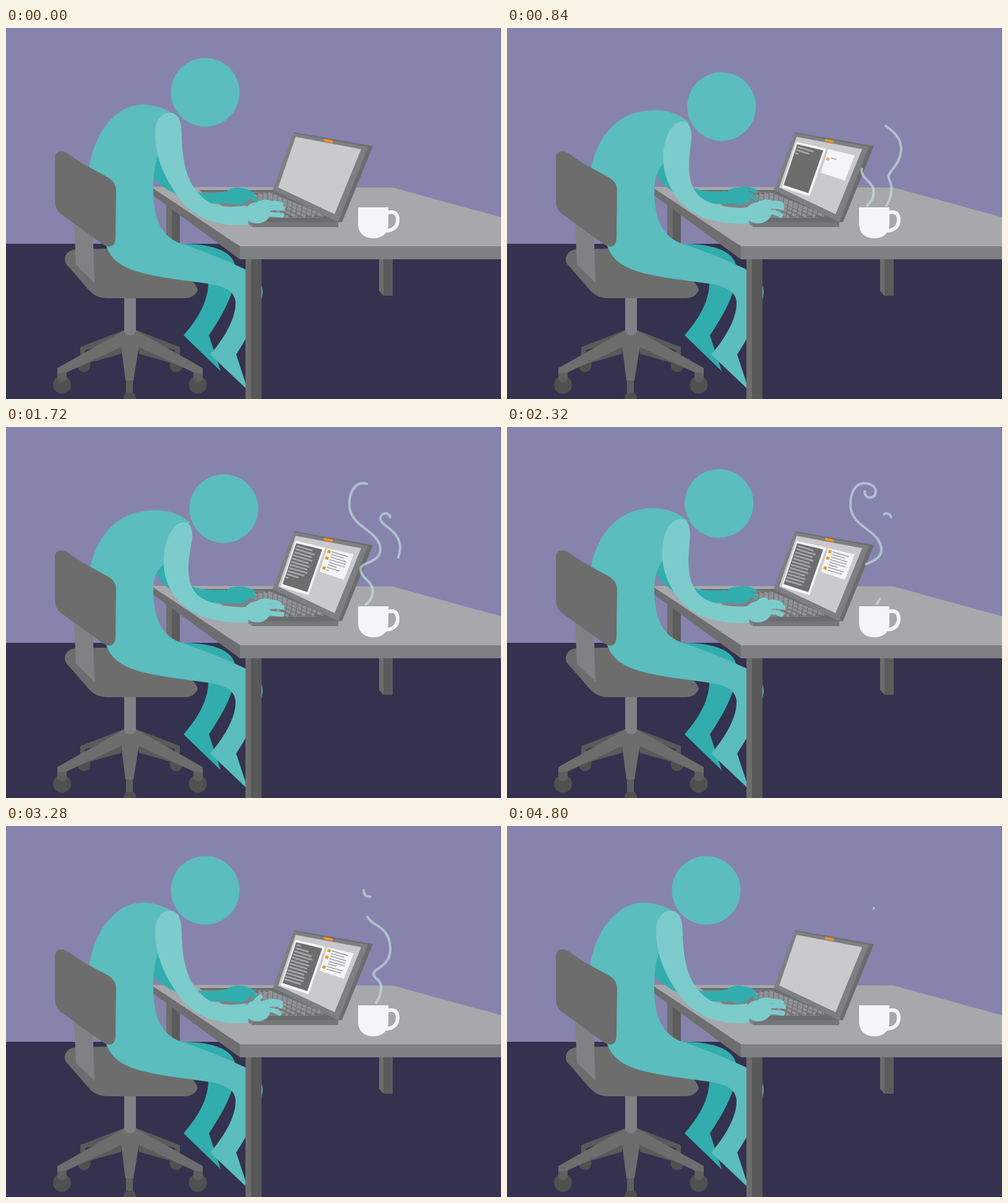
Recreate the animation shown at these times as an HTML page. Size 800 by 600 pixels, loop 4.84 s.

```html
<!DOCTYPE html>
<html lang="en">
<head>
<meta charset="utf-8">
<title>Working late</title>
<style>
  html, body { margin: 0; width: 100%; height: 100%; overflow: hidden; background: #8684ad; }
  svg { display: block; width: 100%; height: 100%; }
  .round { fill: none; stroke-linecap: round; stroke-linejoin: round; }
</style>
</head>
<body>
<svg viewBox="0 0 800 600">
  <path fill="#8684ad" d="M0 0H800V349H0Z"/>
  <path fill="#74729c" d="M799 0H800V349H799Z"/>
  <path fill="#34324e" d="M0 349H800V600H0Z"/>

  <!-- rear table legs -->
  <path fill="#6d6d6e" d="M259 280H268V349H259ZM603 370H610V433L603 425Z"/>
  <path fill="#5b5b5c" d="M268 280H281V349H268ZM610 370H625V433H610Z"/>

  <!-- chair base and seat -->
  <g fill="#505050">
    <circle cx="126" cy="546" r="10.5"/><circle cx="275" cy="546" r="10.5"/>
  </g>
  <path fill="#5a5a5a" d="M190 489L120 516V545H128V521L190 502ZM211 489L281 516V545H273V521L211 502ZM188 508L186 527L122 545L110 540ZM213 508L215 527L279 545L291 540Z"/>
  <g fill="#505050">
    <circle cx="90.5" cy="577" r="14.5"/><circle cx="310" cy="577" r="14.5"/><circle cx="200" cy="598" r="10"/>
  </g>
  <path fill="#5f5f5f" d="M83 551H98V569Q90 577 83 569ZM303 551H318V569Q310 577 303 569ZM194 568H205V590H194Z"/>
  <g fill="#6d6d6d">
    <path d="M191 489L83 550V559L98 557L190 514H211L303 557L318 559V550L210 489Z"/>
    <path d="M190 489H211L215 514L206 570H193L186 514Z"/>
  </g>
  <path fill="#808184" d="M191 430H210V490Q208 497 200.500 497Q193 497 191 490Z"/>
  <path fill="#6d6d6d" d="M95 375C95 365 102 358 115 358L190 356L290 402C302 408 308 416 310 424C306 433 298 437 288 437H165C150 437 142 432 134 424L102 387Q95 381 95 375Z"/>
  <path fill="#808184" d="M110 312L141 330V350L143 412L113 383Z"/>

  <!-- far leg and table -->
  <path fill="#31adae" d="M275 349C322 348 368 356 371 388V403C367 434 347 469 328 497L347 555L287 497C312 468 328 440 327 408Z"/>
  <path fill="#a7a8ab" d="M234 257L625 258L800 306V353H378Z"/>
  <path fill="#6e6e70" d="M234 257L378 353V374L234 268Z"/>
  <path fill="#7f8083" d="M378 353H800V374H378Z"/>

  <!-- laptop -->
  <path fill="#808184" d="M312 263H432L537 308V322H398L340 281Z"/>
  <path fill="#6b6c6e" d="M312 262H432V265H318ZM386 307H537V315H398ZM432 262L537 308V314H520L425 265Z"/>
  <path fill="#6f7072" d="M386 268L430 265L518 306H448Z"/>
  <path fill="#757678" d="M398 314H537V322H398Z"/>
  <g id="keys" stroke="#929396" stroke-width="4.500" stroke-dasharray="7 1.500"/>
  <path fill="#6b6c6e" d="M465 168.500L593 191L543 314H537Z"/>
  <path fill="#7e7f82" d="M465 170L585 192L537 314L431 262Z"/>
  <path fill="#cacacd" d="M468 176L574 196L531 301L440 258Z"/>
  <path stroke="#f7931e" stroke-width="4" d="M514 181L528 184"/>

  <g id="editor">
    <path fill="#f4f5f9" d="M468 184L516 195L489 272L444 258Z"/>
    <path fill="#6d6d6d" d="M469 188L511 198L487 267L447 254Z"/>
    <g id="code" class="round" stroke="#a7a8ab" stroke-width="2.600"/>
  </g>
  <g id="notes">
    <path fill="#f4f5f9" d="M519 196L562 206L546 247L507 234Z"/>
    <g id="list" class="round" stroke="#939598" stroke-width="1.400"/>
    <g id="bullets" fill="#f7931e"/>
  </g>

  <!-- person -->
  <g fill="#31adae" stroke="#31adae">
    <path id="farArm" stroke="none"/>
    <ellipse cx="374" cy="272" rx="21" ry="14" stroke="none"/>
    <g id="farFingers" class="round" stroke-width="6"/>
  </g>
  <path id="torso" fill="#5bbdbd"/>
  <path fill="#6d6d6e" d="M387 374H396V600H387Z"/>
  <path fill="#585858" d="M396 374H413V600H396Z"/>
  <path fill="#6d6d6d" d="M79 210C79 198 92 196 103 205C118 217 140 228 160 239C172 245 178 252 178 264L177 338C177 354 168 357 157 350L92 303C83 297 79 290 79 279Z"/>
  <circle id="head" r="55.500" fill="#5bbdbd"/>
  <g fill="#7ccccc" stroke="#7ccccc">
    <path id="nearArm" stroke="none"/>
    <ellipse cx="406" cy="299" rx="21" ry="17" stroke="none"/>
    <g id="nearFingers" class="round" stroke-width="7.500"/>
  </g>

  <!-- mug and steam -->
  <g id="steam" class="round" stroke="#cde8e6" stroke-width="4" opacity=".6"/>
  <path fill="#f4f5f9" d="M569 290H618V316C618 332 608 340 594 340C579 340 569 332 569 316Z"/>
  <path fill="none" stroke="#f4f5f9" stroke-width="6" d="M617 298.500C628 296 633 300 633 310C633 322 625 328 612 328"/>
</svg>

<script>
const LOOP = 4840, STEP = 40;
const $ = id => document.getElementById(id);

function add(parent, tag, attrs) {
  const el = document.createElementNS('http://www.w3.org/2000/svg', tag);
  for (const name in attrs) el.setAttribute(name, attrs[name]);
  return $(parent).appendChild(el);
}

const ramp = (t, from, to) => Math.min(1, Math.max(0, (t - from) / (to - from)));
const ease = (t, from, to) => { const u = ramp(t, from, to); return u * u * (3 - 2 * u); };

// Blend two paths that share the same commands.
function mix(a, b, p) {
  const target = b.match(/[\d.]+/g);
  let i = 0;
  return a.replace(/[\d.]+/g, n => (+n + (target[i++] - n) * p).toFixed(2));
}

// Show only the part of a path between two fractions.
function trim(el, tail, head, visible) {
  el.style.display = visible ? '' : 'none';
  el.setAttribute('stroke-dasharray', `${Math.max(.001, head - tail)} 2`);
  el.setAttribute('stroke-dashoffset', -tail);
}

const thigh = 'C238 315 255 342 290 351C330 365 360 378 386 390C411 400 417 418 414 434C410 465 390 500 372 528L391 586L330 528C355 499 372 468 371 443C369 424 352 418 330 414C285 407 220 402 190 385C172 375 163 360 160 345Z';
const poses = {
  torso: [
    'M134 228C143 168 178 124 221 124C243 124 262 132 280 145L250 195C240 215 238 238 238 262' + thigh,
    'M135 230C150 166 186 134 245 134.5C266 135 283 142 297 154L258 220C246 228 238 240 238 262' + thigh],
  nearArm: [
    'M241 174C240 150 251 137 265 137C278 137 284 150 284 174C285 225 295 262 330 283C345 290 368 290 388 287L392 318C345 322 308 310 282 278C258 246 242 212 241 174Z',
    'M255 214C256 180 271 154 288 154C298 154 302 165 301 180C296 212 282 264 325 281C345 289 368 292 388 291L392 316C345 318 305 308 280 283C262 262 254 240 255 214Z'],
  farArm: [
    'M246 195C255 235 285 280 355 264L362 283C320 288 270 275 238 243L238 215Z',
    'M258 215C265 245 295 268 355 263L362 284C310 288 265 275 242 237L252 222Z']
};

// Each finger blends from resting to lifted, `rate` times per loop.
const fingers = [
  ['farFingers', 9, 'M372 262Q388 260 399 269', 'M372 262Q386 256 402 264'],
  ['farFingers', 13, 'M380 267Q396 268 405 279', 'M380 267Q393 265 400 274'],
  ['nearFingers', 11, 'M404 287Q416 278 427 283', 'M400 290Q404 280 411 276'],
  ['nearFingers', 12, 'M414 288Q430 280 444 285', 'M414 288Q426 277 441 288'],
  ['nearFingers', 8, 'M414 294Q430 289 447 292', 'M414 294Q430 284 444 291'],
  ['nearFingers', 14, 'M414 301Q430 301 446 303', 'M414 301Q428 293 442 303']
].map(([hand, rate, rest, lifted]) => ({ el: add(hand, 'path', {}), rate, rest, lifted }));

const steam = [
  { d: 'M582 287C591 279 594 270 592 260C590 249 573 243 573 230C573 218 605 220 605 198C605 178 582 167 570 156C560 147 555 138 555 125C555 108 562 91 577 91C590 91 596 98 596 104C596 113 588 115 585 114C580 113 578 109 578 104', head: [227, 2230], tail: [1720, 3540] },
  { d: 'M613 287C620 278 622 265 621 255C620 245 615 245 617 238C619 231 637 218 637 195C637 167 605 159 605 149C605 139 618 136 621 146', head: [0, 1180], tail: [916, 2616] },
  { d: 'M598 286C606 274 607 264 606 257C604 248 594 246 594 239C595 229 621 228 621 199C621 167 600 163 590 154C584 148 581 143 581 138C581 130 590 127 593 133', head: [2116, 3637], tail: [3240, 4680], lasts: true }
].map(s => ({ ...s, el: add('steam', 'path', { d: s.d, pathLength: 1 }) }));

for (let i = 0; i < 5; i++)
  add('keys', 'path', { d: `M${424 - 8 * i} ${267.5 + .8 * i}L${512 - 14 * i} ${303.5 + .6 * i}` });

function textLine(parent, x, y, width, start, end) {
  const el = add(parent, 'path', { d: `M${x} ${y}l${width} ${width * .3}`, pathLength: 1 });
  return { el, start, end };
}

const lines = [
  ...[24, 29, 26, 29, 25, 28, 26, 28, 25, 27, 27, 25].map((width, i) =>
    textLine('code', 470.5 - 1.8 * i, 192.5 + 5.05 * i, width, 600 + 110 * i, 3140 + 80 * i)),
  ...[25, 20, 25, 25, 25, 13, 24, 23].map((width, i) => {
    const order = [4, 5, 0, 1, 2, 3, 6, 7][i];
    return textLine('list', 527 - 1.25 * i, 202 + 4.2 * i, width, 780 + 131 * order, 3400 + 50 * i);
  })
];

const bullets = [[522, 201.5, 1290, 3390], [518.5, 212, 760, 3490], [514, 228, 1550, 3690]]
  .map(([x, y, start, end]) => ({
    el: add('bullets', 'path', { d: 'M-2.500-2.500h5v5h-5z', transform: `translate(${x} ${y}) rotate(14)` }),
    start, end
  }));

function popWindow(id, x, y, start, end) {
  const scale = ease(t, start, start + 160) - ease(t, end, end + 160);
  $(id).setAttribute('transform', `translate(${x} ${y}) scale(${scale}) translate(${-x} ${-y})`);
}

let t = 0;
function draw() {
  const lean = ease(t, 400, 1000) - ease(t, 2040, 2800);
  for (const id in poses) $(id).setAttribute('d', mix(...poses[id], lean));
  $('head').setAttribute('cx', 322 + 30 * lean);
  $('head').setAttribute('cy', 104 + 28 * lean);

  for (const f of fingers) {
    const lift = (1 - Math.cos(2 * Math.PI * f.rate * t / LOOP)) / 2;
    f.el.setAttribute('d', mix(f.rest, f.lifted, lift));
  }
  for (const s of steam) {
    const head = ease(t, ...s.head), tail = ease(t, ...s.tail);
    trim(s.el, Math.min(tail, .998), head, head > 0 && (tail < 1 || s.lasts));
  }

  popWindow('editor', 480, 228, 400, 4240);
  popWindow('notes', 534, 221, 520, 4160);
  for (const l of lines) {
    const length = ramp(t, l.start, l.start + 200) - ramp(t, l.end, l.end + 180);
    trim(l.el, 0, length, length > 0);
  }
  for (const b of bullets)
    b.el.setAttribute('opacity', ramp(t, b.start, b.start + 110) - ramp(t, b.end, b.end + 110));
}

const began = performance.now();
function tick() {
  t = Math.floor((performance.now() - began) % LOOP / STEP) * STEP;
  draw();
  requestAnimationFrame(tick);
}
tick();
</script>
</body>
</html>
```
